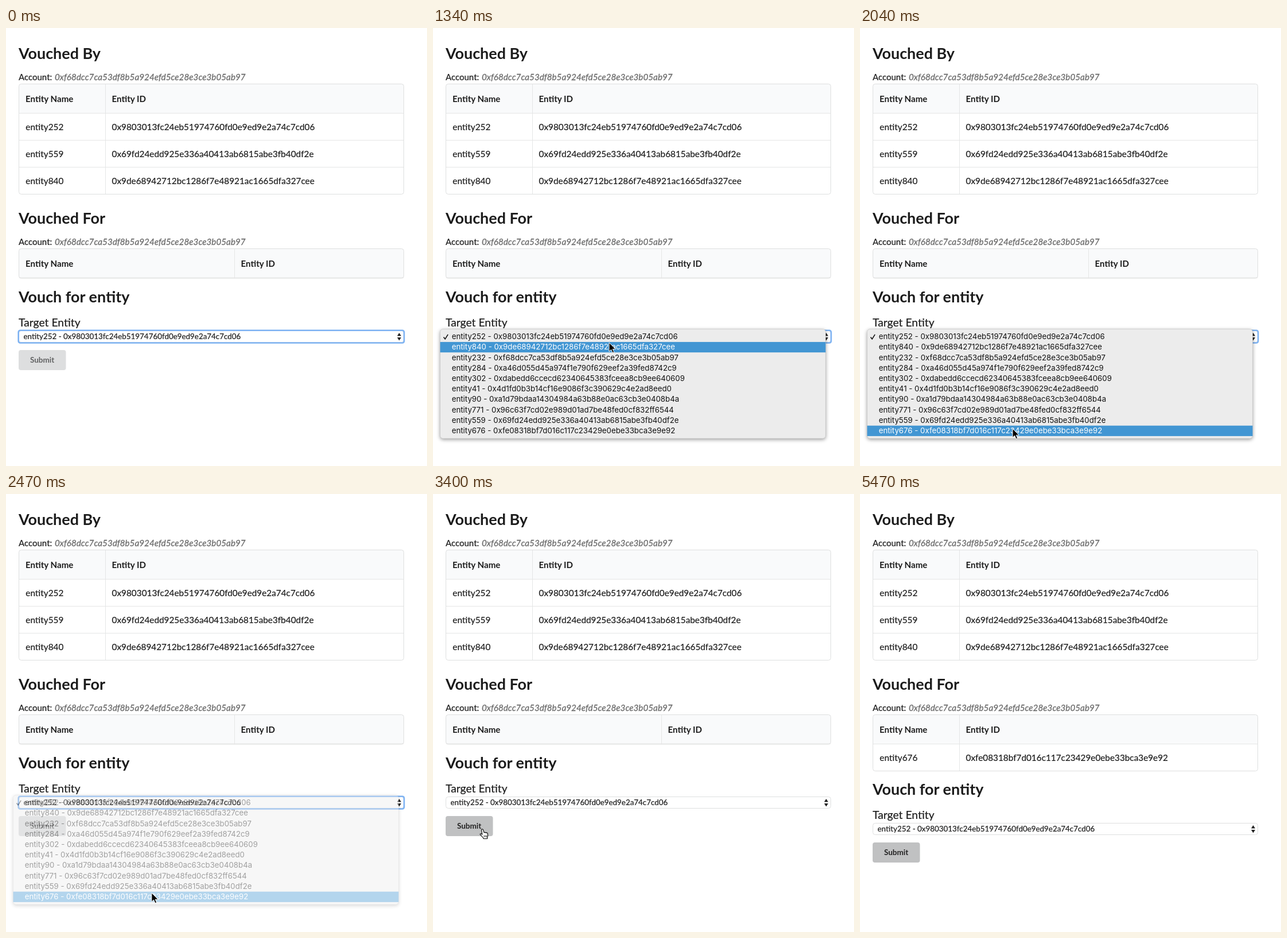
Recreate the animation shown at these times as an HTML page. Size 734 by 763 pixels, loop 7940 ms.

```html
<!DOCTYPE html>
<html lang="en">
<head>
<meta charset="utf-8">
<title>Vouch for entity</title>
<style>
html, body { margin: 0; width: 100%; height: 100%; overflow: hidden; background: #fff; }
svg { display: block; width: 734px; height: 763px; font-family: Lato, sans-serif; fill: #1c1c1c; }
text { white-space: pre; }
.h1 { font-size: 26.9px; font-weight: 700; }
.label { font-size: 19.3px; }
.body { font-size: 15.32px; }
.head { font-size: 15.1px; font-weight: 700; }
.acct { font-size: 15px; }
.hash { font-size: 15.25px; font-style: italic; fill: #6c6c6c; }
.pick { font-size: 13.4px; }
.btn { font-size: 13.5px; font-weight: 700; }
.body, .acct, .pick, .label { stroke: #1c1c1c; stroke-width: .2px; }
.hash { stroke: #6c6c6c; stroke-width: .3px; }
.line { fill: #e5e6e6; }
.frame { fill: none; stroke: #dedfdf; }
#menu { font: 13.25px Inter, sans-serif; fill: #111; }
#panel { filter: drop-shadow(0 2px 3px rgba(0,0,0,.38)); }
</style>
</head>
<body>
<svg id="stage" viewBox="0 0 734 763"></svg>
<script>
const LOOP = 7940, ROW = 18.22, MENU_TOP = 528.7;
const account = '0xf68dcc7ca53df8b5a924efd5ce28e3ce3b05ab97';
const entities = [
  ['entity252', '0x9803013fc24eb51974760fd0e9ed9e2a74c7cd06'],
  ['entity840', '0x9de68942712bc1286f7e48921ac1665dfa327cee'],
  ['entity232', account],
  ['entity284', '0xa46d055d45a974f1e790f629eef2a39fed8742c9'],
  ['entity302', '0xdabedd6ccecd62340645383fceea8cb9ee640609'],
  ['entity41', '0x4d1fd0b3b14cf16e9086f3c390629c4e2ad8eed0'],
  ['entity90', '0xa1d79bdaa14304984a63b88e0ac63cb3e0408b4a'],
  ['entity771', '0x96c63f7cd02e989d01ad7be48fed0cf832ff6544'],
  ['entity559', '0x69fd24edd925e336a40413ab6815abe3fb40df2e'],
  ['entity676', '0xfe08318bf7d016c117c23429e0ebe33bca3e9e92']
];

const text = (x, y, cls, s, extra = '') => `<text x="${x}" y="${y}" class="${cls}" ${extra}>${s}</text>`;
const box = (x, y, w, h, extra = '') => `<rect x="${x}" y="${y}" width="${w}" height="${h}" ${extra}/>`;

function table(y, split, rows) {
  const bottom = y + 51 + Math.max(rows.length * 47, .5);
  let s = box(22.5, y + .5, 671, 51, 'rx="4" fill="#f9fafb"');
  if (rows.length) s += box(23, y + 51, 670, rows.length * 47, 'fill="#fff"');
  rows.forEach(([name, id], i) => {
    const top = y + 51 + i * 47;
    s += box(23, top, 670, 1, 'class="line"');
    s += text(34.3, top + 29.5, 'body', name) + text(split + 11.6, top + 29.5, 'body', id);
  });
  if (!rows.length) s += box(23, y + 50.5, 670, 1, 'class="line"');
  s += box(split, y, 1, bottom - y, 'class="line"');
  s += text(34.1, y + 31.5, 'head', 'Entity Name') + text(split + 11.6, y + 31.5, 'head', 'Entity ID');
  return s + box(22.5, y + .5, 671, bottom - y, 'rx="4" class="frame"');
}

const section = (y, title) => text(22, y, 'h1', title) +
  text(22, y + 37.2, 'acct', 'Account:') + text(85, y + 37.2, 'hash', account);

const pick = i => entities[i].join(' - ');

const form = text(22, 478, 'h1', 'Vouch for entity') +
  text(22, 520, 'label', 'Target Entity') +
  box(22.5, 527.5, 671, 20, 'rx="4" fill="#fff" stroke="#dedfdf"') +
  box(21.7, 526.7, 672.4, 21.8, 'rx="3" fill="none" stroke="#7db2f2" stroke-width="2.6" id="ring"') +
  text(30.5, 542.4, 'pick', pick(0)) +
  '<path d="M682 536.5l3.5-5.5 3.5 5.5zM682 539l3.5 5.5 3.5-5.5z" fill="#222"/>' +
  box(22, 561, 82.5, 35, 'rx="4" id="button"') +
  text(41.9, 583.3, 'btn', 'Submit', 'id="submit"');

const menu = box(12.5, 524.5, 672, 190.5, 'rx="5" id="panel" fill="#ececec" stroke="#c4c4c4" stroke-width=".6"') +
  box(12.5, 0, 672, ROW, 'id="bar" fill="#4296d3"') +
  entities.map((e, i) => text(32.7, 542.1 + i * ROW, 'item', pick(i))).join('') +
  '<path d="M18.5 538.5l2.6 3.3 5-8" fill="none" stroke="#111" stroke-width="1.6" id="tick"/>';

const arrow = '<path id="arrow" d="M0 0v15.5l3.6-3.4 2.5 5.6 2.6-1.1-2.4-5.4h5z" fill="#000" stroke="#fff" stroke-width="1"/>';
const hand = '<g id="hand" fill="#fff" stroke="#000" stroke-width="1.1" stroke-linejoin="round">' +
  '<path d="M-1.6 1.2q1.6-1.8 3 .2l1.6 5q1-1.2 2.2.2 1.2-1 2.2.4 1.6-.6 1.9 1.2l.3 4-1 2.6v2.2h-6.4q-1-2.3-3-4l-3-3.4q0-2 2-1.1l1.6 1.2z"/>' +
  '<path d="M3.2 11v3.6M5.4 11v3.6M7.5 11v3.6" fill="none" stroke-width=".8"/></g>';

const stage = document.getElementById('stage');
stage.innerHTML = section(54, 'Vouched By') + table(97, 173, [0, 8, 1].map(i => entities[i])) +
  section(341, 'Vouched For') +
  `<g id="before">${table(384, 398, [])}</g><g id="after">${table(384, 173, [entities[9]])}</g>` +
  `<g id="form">${form}</g><g id="menu">${menu}</g><g id="cursor">${arrow}${hand}</g>`;

const $ = id => document.getElementById(id);
const items = [...document.querySelectorAll('.item')];
const show = (id, on) => $(id).style.display = on ? '' : 'none';

// Pointer strokes: start, end, then positions joined by a smooth curve of [time, x, y].
const strokes = [
  [140, 4000, [
    [140, 335, 5], [300, 333, 90], [500, 325, 300], [700, 309, 490], [870, 302, 541],
    [1240, 302, 541], [1340, 307, 548], [1700, 298, 620], [2040, 266, 698],
    [2240, 266, 698], [2470, 254, 695], [2720, 170, 645], [3000, 88, 587],
    [3120, 86, 583], [3540, 86, 584], [3680, 200, 597], [3840, 480, 611], [4000, 740, 613]]],
  [4240, 4470, [[4240, 711, 358], [4340, 610, 195], [4470, 460, -15]]]
];

function pointer(t) {
  const stroke = strokes.find(([a, b]) => t >= a && t < b);
  if (!stroke) return null;
  const p = stroke[2], i = p.findIndex(k => k[0] > t) - 1;
  const a = p[i], b = p[i + 1], d = b[0] - a[0], u = (t - a[0]) / d, v = 1 - u;
  const slope = (j, c) => {
    const l = p[j - 1], k = p[j], r = p[j + 1];
    if (!l || !r) return (b[c] - a[c]) / d;
    if ((r[c] - k[c]) * (k[c] - l[c]) <= 0) return 0;
    return 2 / ((k[0] - l[0]) / (k[c] - l[c]) + (r[0] - k[0]) / (r[c] - k[c]));
  };
  const at = c => a[c] * v * v * (1 + 2 * u) + b[c] * u * u * (3 - 2 * u) +
    d * u * v * (v * slope(i, c) - u * slope(i + 1, c));
  return [at(1), at(2)];
}

function draw(t) {
  const done = t >= 5470, clicked = t >= 3200;
  const pos = pointer(t);
  const over = pos && pos[0] > 22 && pos[0] < 104 && pos[1] > 561 && pos[1] < 596;

  show('before', !done);
  show('after', done);
  $('form').setAttribute('transform', `translate(0 ${done ? 46 : 0})`);
  show('ring', !clicked);
  $('button').setAttribute('fill', clicked ? '#c0c1c2' : over ? '#cacbcd' : '#dddedf');
  $('submit').setAttribute('fill', clicked || over ? '#222' : '#606162');

  const open = t >= 940 && t < 2550;
  show('menu', open);
  if (open) {
    const y = t < 2240 ? pos[1] : 698;
    const row = Math.max(0, Math.min(9, Math.floor((y - MENU_TOP) / ROW)));
    const lit = t < 2240 || t >= 2300;
    $('menu').style.opacity = Math.min(1, (2550 - t) / 200);
    $('bar').setAttribute('y', MENU_TOP + row * ROW);
    show('bar', lit);
    items.forEach((el, i) => el.setAttribute('fill', lit && i === row ? '#fff' : '#111'));
    $('tick').setAttribute('stroke', lit && row === 0 ? '#fff' : '#111');
  }

  show('cursor', pos);
  if (pos) {
    $('cursor').setAttribute('transform', `translate(${pos[0]} ${pos[1]})`);
    show('arrow', !over);
    show('hand', over);
  }
}

const start = performance.now();
function tick() {
  draw((performance.now() - start) % LOOP);
  requestAnimationFrame(tick);
}
draw(0);
requestAnimationFrame(tick);
</script>
</body>
</html>
```
